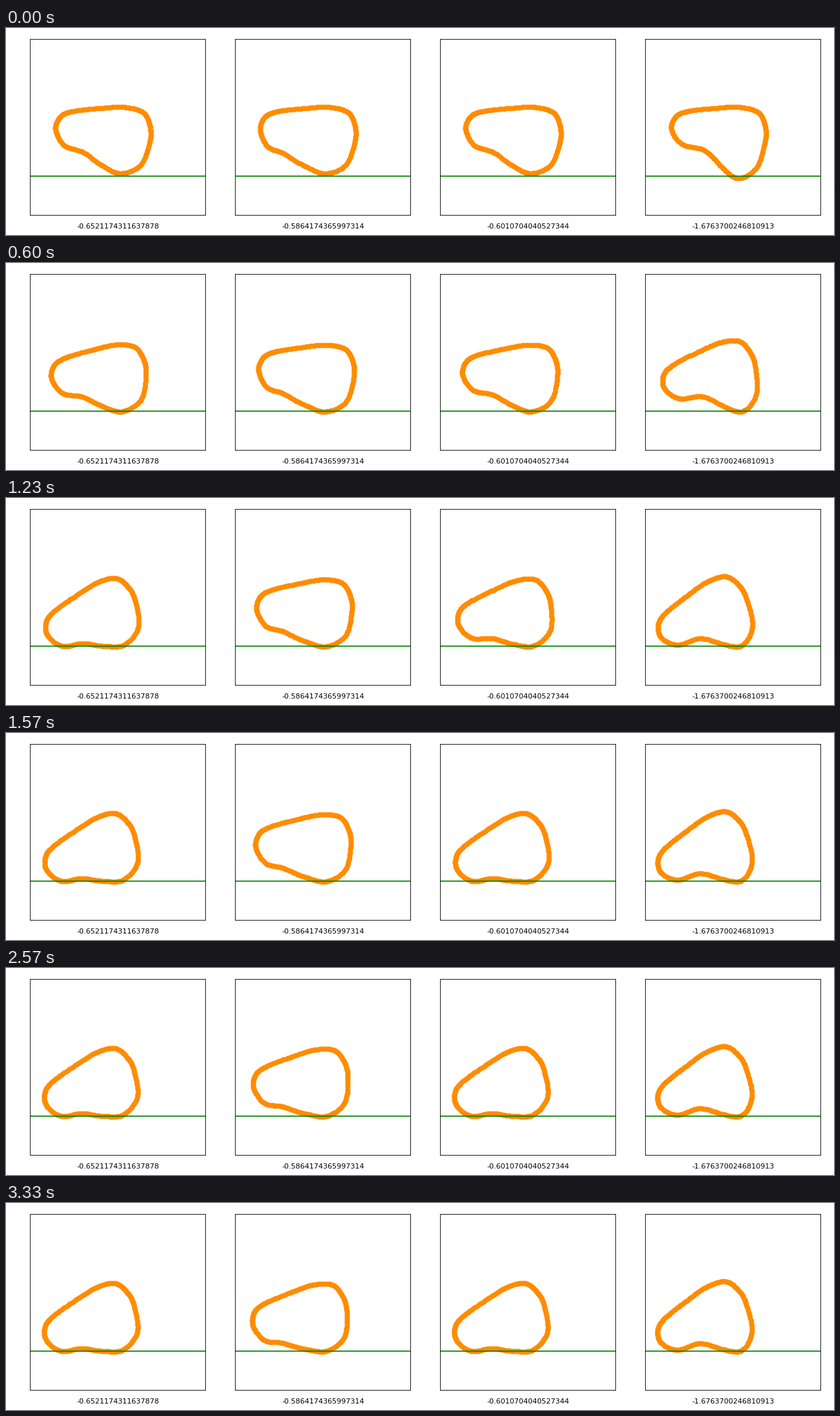
Animation of 1280 by 320 pixels, one loop 3360 ms. Source, as a matplotlib script:

```python
import numpy as np
import matplotlib.pyplot as plt
from matplotlib.animation import FuncAnimation

W, H, DPI = 1280, 320, 80
LOOP, INTERVAL, STEPS = 3360, 20, 101
LEFT, WIDTH, PITCH = 37.4, 271, 317
TOP, BOTTOM = 17, 289
GROUND = 229.8

# Key points of the body, clockwise from its left end
KEYS = np.array([
    (76.5, 157), (84, 137), (104, 128.5), (145, 124), (182, 122.3),
    (211, 130), (222, 150), (222.3, 175), (208, 212), (176, 224.7),
    (147, 211.5), (119, 192), (90, 181.5)])
CENTER = np.array([153.3, 168.4])


def smooth(pts, n=20):
    """Closed Catmull-Rom curve through the points."""
    u = np.linspace(0, 1, n, endpoint=False)[None, :, None]
    p0, p1, p2, p3 = (np.roll(pts, k, axis=0)[:, None] for k in (1, 0, -1, -2))
    curve = p1 + 0.5 * u * (p2 - p0 + u * (2 * p0 - 5 * p1 + 4 * p2 - p3
                            + u * (3 * (p1 - p2) + p3 - p0)))
    return curve.reshape(-1, 2)


def push(pts, around, radius, by):
    """Shift the points near a spot, fading out with distance."""
    dist = np.hypot(*(pts - around).T)
    return np.exp(-(dist / radius) ** 2)[:, None] * np.array(by)


def turn(pts, deg):
    """Rotate counter-clockwise on screen (y points down)."""
    a = np.radians(deg)
    c, s = np.cos(a), np.sin(a)
    return pts @ np.array([[c, -s], [s, c]])


def topple(x):
    return min(1, x) ** 1.5


def sink(x):
    return np.sin(np.pi / 2 * x) ** 1.3


class Body:
    """A soft shape that drops to the ground, tips over and creeps to rest."""

    def __init__(self, label, angle, travel, duration, ease=topple,
                 hollow=0, foot=0):
        self.label, self.angle, self.travel = label, angle, travel
        self.duration, self.ease = duration, ease
        pts = smooth(KEYS)
        self.shape = (pts - CENTER
                      + hollow * push(pts, (120, 195), 40, (10, -4))
                      + foot * push(pts, (172, 222), 36, (5, 8)))
        self.low = self.shape[:, 1].max() + CENTER[1]

    def at(self, t):
        p = self.ease(t / self.duration)
        deg = p * self.angle
        stretch = 0.001 * deg
        pts = turn(self.shape, deg) * (1 - stretch / 2, 1 + stretch)
        creep = 2.4 / self.duration * np.exp(-max(0, t - self.duration) / 0.28)
        pts[:, 0] += CENTER[0] + p * (creep - self.travel)
        drop = min(1, t / 0.17) ** 2
        pts[:, 1] += self.low + drop * (GROUND - self.low) - pts[:, 1].max()
        return pts


bodies = [
    Body("-0.6521174311637878", 28, 18.4, 1.2),
    Body("-0.5864174365997314", 16, 12.2, 3.6, ease=sink, hollow=-0.6),
    Body("-0.6010704040527344", 28, 18.4, 1.55),
    Body("-1.6763700246810913", 31, 22.4, 0.79, hollow=0.9, foot=1),
]

fig = plt.figure(figsize=(W / DPI, H / DPI), dpi=DPI, facecolor="white")
dots = []
for k, body in enumerate(bodies):
    left = LEFT + PITCH * k
    ax = fig.add_axes([left / W, 1 - BOTTOM / H, WIDTH / W, (BOTTOM - TOP) / H])
    ax.set(xlim=(LEFT, LEFT + WIDTH), ylim=(BOTTOM, TOP), xticks=[], yticks=[])
    ax.axhline(229, color="green")
    dots.append(ax.scatter(*body.at(0).T, color="darkorange"))
    fig.text((left + WIDTH / 2) / W, 10 / H, body.label,
             ha="center", va="baseline", fontsize=10, family="DejaVu Sans")


def draw(i):
    step = int((i + 0.5) * INTERVAL * STEPS / LOOP + 0.2)
    t = min(step, STEPS - 1) * LOOP / STEPS / 1000
    for dot, body in zip(dots, bodies):
        dot.set_offsets(body.at(t))
    return dots


anim = FuncAnimation(fig, draw, frames=LOOP // INTERVAL, interval=INTERVAL,
                     init_func=lambda: draw(0), repeat=True, repeat_delay=0)
plt.show()
```
